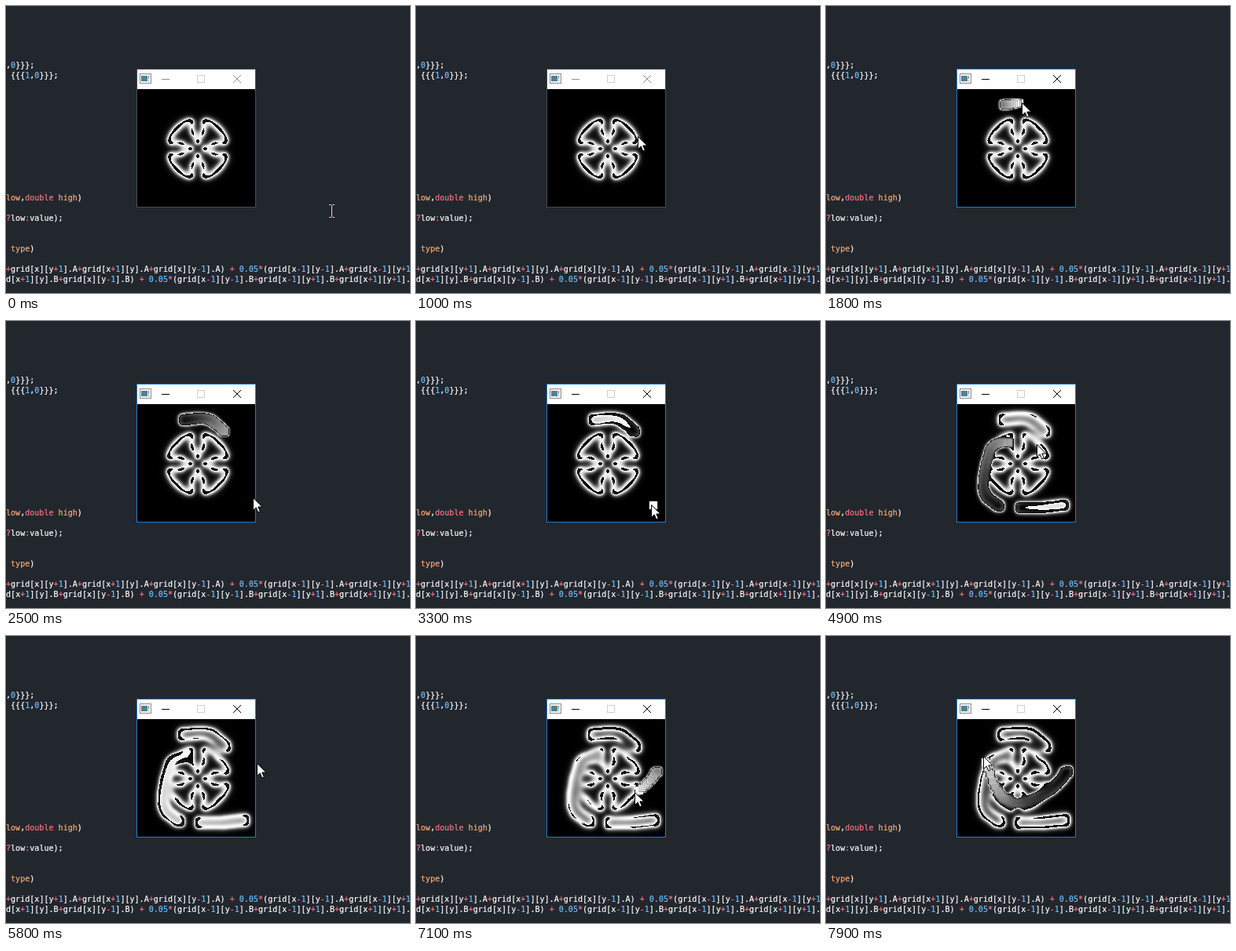
Recreate the animation shown at these times as an HTML page with a canvas. Size 514 by 366 pixels, loop 8 s.

```html
<!DOCTYPE html>
<html lang="en">
<head>
<meta charset="utf-8">
<title>Reaction diffusion</title>
<style>
html, body { margin: 0; width: 100%; height: 100%; overflow: hidden; background: #22272e; }
body { position: relative; }
pre { position: absolute; left: 0; margin: 0; color: #fff; white-space: pre;
  font: 10.05px/13px "DejaVu Sans Mono", monospace; -webkit-text-stroke: 0.2px; }
.num { color: #6fbdfa; }
.op, .key { color: #fa7480; }
.arg { color: #fdaa70; }
#win { position: absolute; left: 166px; top: 80px; width: 150px; height: 175px;
  border: 1px solid #444a50; background: #fff; }
#win.active { border-color: #1f7ccc; }
#bar { position: absolute; left: 0; top: 0; stroke: #8c8c8c; }
.active #bar { stroke: #000; }
#field { position: absolute; left: 0; top: 25px; }
#arrow, #beam { position: absolute; left: 0; top: 0; }
</style>
</head>
<body>
<div id="code"></div>
<div id="win">
  <svg id="bar" width="150" height="25" fill="none" shape-rendering="crispEdges">
    <path d="M3.5 5.5h14v12h-14z" fill="#f4f4f4" stroke="#8a8f94"/>
    <path d="M5 8h8v7H5z" fill="#4a8494" stroke="none"/>
    <path d="M14.5 8v4M14.5 14v1" stroke="#777"/>
    <path d="M31 12.5h10"/>
    <path d="M76.5 7.5h9v9h-9z" stroke="#cfcfcf"/>
    <path d="M122 7l10 10M132 7l-10 10" shape-rendering="auto"/>
  </svg>
  <canvas id="field" width="150" height="150"></canvas>
</div>
<svg id="arrow" width="14" height="21"><path d="M.5.5v16l3.7-3.6 2.5 6 2.6-1.1-2.5-5.8h5.1z" fill="#fff" stroke="#000"/></svg>
<svg id="beam" width="9" height="17" fill="none" stroke="#d8d8d8"><path d="M1 .5h2.5l1 1 1-1H8M4.5 1.5v14M1 16.5h2.5l1-1 1 1H8"/></svg>
<script>
const $ = id => document.getElementById(id);

// Code behind the window: [row, text, argument names]
const lines = [
  [0, ",0}}};"],
  [1, " {{{1,0}}};"],
  [13, "low,double high)", /^(low|high)$/],
  [15, "?low:value);"],
  [18, " type)", /^type$/],
  [20, "+grid[x][y+1].A+grid[x+1][y].A+grid[x][y-1].A) + 0.05*(grid[x-1][y-1].A+grid[x-1][y+1].A"],
  [21, "d[x+1][y].B+grid[x][y-1].B) + 0.05*(grid[x-1][y-1].B+grid[x-1][y+1].B+grid[x+1][y+1].B"]
];
const kind = (s, args) => /^\d/.test(s) ? "num" : /^[-+*?:]/.test(s) ? "op"
  : s === "double" ? "key" : args && args.test(s) ? "arg" : "";
for (const [row, text, args] of lines) {
  const pre = document.createElement("pre");
  pre.style.top = 69 + row * 13 + "px";
  pre.innerHTML = text.replace(/[\d.]*\d|\w+|[-+*?:]/g, s => `<span class="${kind(s, args)}">${s}</span>`);
  $("code").append(pre);
}

// Pointer: smooth strokes with the button held, rests at a single point, straight glides between
const moves = [
  { from: 0, to: 200, at: [[414, 261]] },
  { from: 1350, to: 2250, at: [[226, 126], [236, 125], [250, 124], [264, 129], [279, 142]] },
  { from: 2500, to: 2900, at: [[315, 226]] },
  { from: 3250, to: 3790, at: [[303, 235], [275, 238], [247, 238]] },
  { from: 3830, to: 4720, at: [[222, 237], [203, 222], [201, 195], [212, 160], [233, 155]] },
  { from: 5150, to: 6500, at: [[320, 163]] },
  { from: 6750, to: 7940, at: [[308, 171], [285, 196], [247, 213], [220, 200], [199, 150]] }
];
const mix = (a, b, k) => a.map((v, i) => v + (b[i] - v) * k);
function curve(at, k) {
  const u = k * (at.length - 1), i = Math.min(Math.floor(u), at.length - 2), s = u - i;
  const b = at[i], c = at[i + 1], a = at[i - 1] || b, d = at[i + 2] || c;
  return b.map((v, j) => v + s / 2 * (c[j] - a[j]
    + s * (2 * a[j] - 5 * v + 4 * c[j] - d[j] + s * (3 * (v - c[j]) + d[j] - a[j]))));
}
function pointer(t) {
  const i = Math.max(0, moves.findLastIndex(m => m.from <= t));
  const { from, to, at } = moves[i], next = moves[i + 1], end = at[at.length - 1];
  const down = at.length > 1 && t <= to;
  const [x, y] = down ? curve(at, (t - from) / (to - from))
    : t > to && next ? mix(end, next.at[0], (t - to) / (next.from - to)) : end;
  return { x, y, down };
}

// Gray-Scott reaction diffusion
const N = 150, FEED = 0.055, KILL = 0.062, CX = 77, CY = 76, REACH = 38;
const grid = v => new Float64Array(N * N).fill(v);
let A = grid(1), B = grid(0), A2 = grid(1), B2 = grid(0);
const clamp = v => v < 0 ? 0 : v > 1 ? 1 : v;
const spread = (g, i) => 0.2 * (g[i - 1] + g[i + 1] + g[i - N] + g[i + N])
  + 0.05 * (g[i - N - 1] + g[i - N + 1] + g[i + N - 1] + g[i + N + 1]) - g[i];

function step(x0, y0, x1, y1) {
  for (let y = y0; y < y1; y++) {
    for (let i = y * N + x0, end = y * N + x1; i < end; i++) {
      const a = A[i], b = B[i], r = a * b * b;
      A2[i] = clamp(a + spread(A, i) - r + FEED * (1 - a));
      B2[i] = clamp(b + 0.5 * spread(B, i) + r - (KILL + FEED) * b);
    }
  }
  [A, A2, B, B2] = [A2, A, B2, B];
}
function stamp(x, y) {
  x = Math.round(x) - 5;
  y = Math.round(y) - 5;
  for (let j = Math.max(1, y); j < Math.min(N - 1, y + 10); j++)
    for (let i = Math.max(1, x); i < Math.min(N - 1, x + 10); i++) B[j * N + i] = 1;
}
// Farthest row above the centre where B exceeds A
function reach() {
  for (let y = 1; y < CY; y++)
    for (let x = 1; x < N; x++) if (B[y * N + x] > A[y * N + x]) return CY - y;
  return 0;
}

stamp(CX, CY);
for (let n = 0, r = 5; n < 6000 && r < REACH; n++) {
  if (n % 20 === 0) r = Math.max(5, reach());
  const w = Math.min(r + 24, 70);
  step(CX - w, CY - w, CX + w, CY + w);
}

const ctx = $("field").getContext("2d");
const TICK = 100, COUNT = 80, STEP = 40, LAG = 60;
function shot() {
  const img = ctx.createImageData(N, N), px = new Uint32Array(img.data.buffer);
  for (let i = 0; i < px.length; i++) {
    const v = 255 * (1 - A[i] + B[i]) & 255;   // wraps where B > A
    px[i] = 0xff000000 | v * 0x010101;
  }
  return img;
}
const shots = [];
for (let f = 0, t = 0; f < COUNT; f++) {
  for (; t < f * TICK; t += STEP) {
    const p = pointer(t + STEP - LAG);
    if (p.down) stamp(p.x - 167, p.y - 106);
    step(1, 1, N - 1, N - 1);
  }
  shots.push(shot());
}

const start = performance.now();
let last = -1;
function place(el, x, y, on) {
  el.style.transform = `translate(${Math.round(x)}px,${Math.round(y)}px)`;
  el.style.visibility = on ? "visible" : "hidden";
}
function draw() {
  const f = Math.floor((performance.now() - start) / TICK) % COUNT;
  if (f !== last) {
    const t = f * TICK, p = pointer(t), active = t >= moves[1].from, beam = !active && p.x > 317;
    ctx.putImageData(shots[f], 0, 0);
    $("win").classList.toggle("active", active);
    place($("arrow"), p.x - 1, p.y - 1, !beam);
    place($("beam"), p.x - 4, p.y - 8, beam);
    last = f;
  }
  requestAnimationFrame(draw);
}
draw();
</script>
</body>
</html>
```
